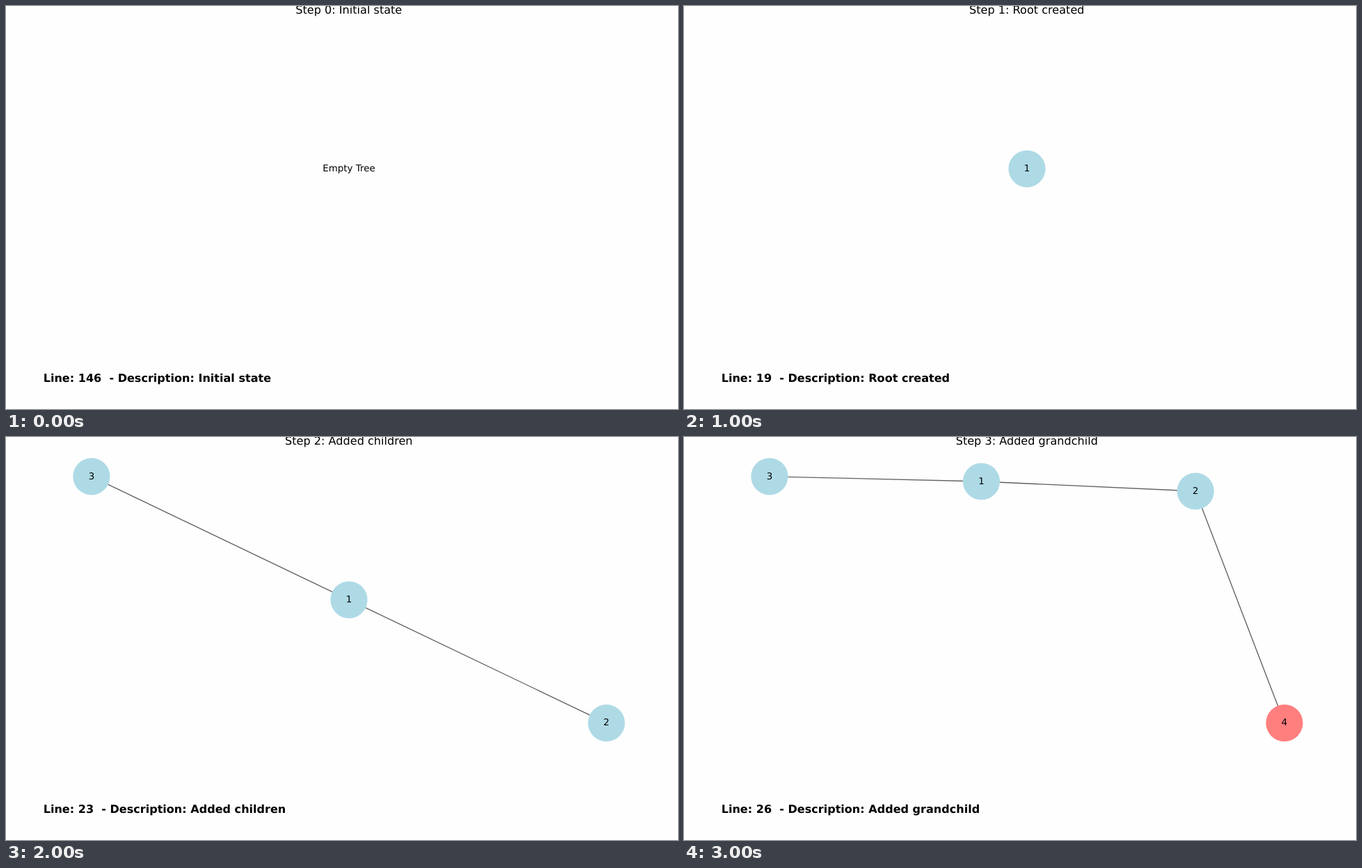
Recreate the animation shown at these times as an HTML page. Size 966 by 580 pixels, loop 4 s.

```html
<!DOCTYPE html>
<html lang="en">
<head>
<meta charset="utf-8">
<title>Tree steps</title>
<style>
  html, body { margin: 0; width: 100%; height: 100%; overflow: hidden; background: #fefefe; }
  svg { display: block; width: 966px; height: 580px; }
  text { font-family: "DejaVu Sans", sans-serif; font-size: 13.4px; text-anchor: middle;
         white-space: pre; text-rendering: geometricPrecision; }
  .title { font-size: 16.1px; }
  .note { font-size: 16.06px; font-weight: bold; text-anchor: start; }
  line { stroke: #606060; stroke-width: 1.35; }
</style>
</head>
<body>
<svg id="stage" viewBox="0 0 966 580"></svg>
<script>
const BLUE = "#aedae6", RED = "#ff7f7f";
const MID = [493, 234.3], TOP_LEFT = [122.9, 56.8], LOW_RIGHT = [863.1, 411.6];
const STEP_MS = 1000;

const steps = [
  { line: 146, label: "Initial state", nodes: {}, edges: [] },
  { line: 19, label: "Root created", nodes: { 1: MID }, edges: [] },
  { line: 23, label: "Added children",
    nodes: { 1: MID, 2: LOW_RIGHT, 3: TOP_LEFT }, edges: [[1, 2], [1, 3]] },
  { line: 26, label: "Added grandchild",
    nodes: { 1: [427.5, 64], 2: [735.3, 78], 3: TOP_LEFT, 4: LOW_RIGHT },
    edges: [[1, 2], [1, 3], [2, 4]], fresh: "4" },
];

const stage = document.getElementById("stage");

function add(parent, tag, attrs, text) {
  const el = document.createElementNS("http://www.w3.org/2000/svg", tag);
  for (const key in attrs) el.setAttribute(key, attrs[key]);
  if (text !== undefined) el.textContent = text;
  return parent.appendChild(el);
}

function buildStep({ line, label, nodes, edges, fresh }, i) {
  const g = add(stage, "g", { visibility: "hidden" });
  add(g, "text", { class: "title", x: 492.8, y: 11.1 }, `Step ${i}: ${label}`);
  for (const [a, b] of edges) {
    const [x1, y1] = nodes[a], [x2, y2] = nodes[b];
    add(g, "line", { x1, y1, x2, y2 });
  }
  for (const [name, [x, y]] of Object.entries(nodes)) {
    add(g, "circle", { cx: x, cy: y, r: 26.6, fill: name === fresh ? RED : BLUE });
    add(g, "text", { x, y: y + 3.8 }, name);
  }
  if (!Object.keys(nodes).length) add(g, "text", { x: MID[0], y: MID[1] + 3.8 }, "Empty Tree");
  add(g, "text", { class: "note", x: 53.7, y: 541 }, `Line: ${line}  - Description: ${label}`);
  return g;
}

const groups = steps.map(buildStep);
const start = performance.now();

function draw(now) {
  const current = Math.floor(Math.max(0, now - start) / STEP_MS) % groups.length;
  groups.forEach((g, i) => g.setAttribute("visibility", i === current ? "visible" : "hidden"));
  requestAnimationFrame(draw);
}
draw(start);
</script>
</body>
</html>
```
